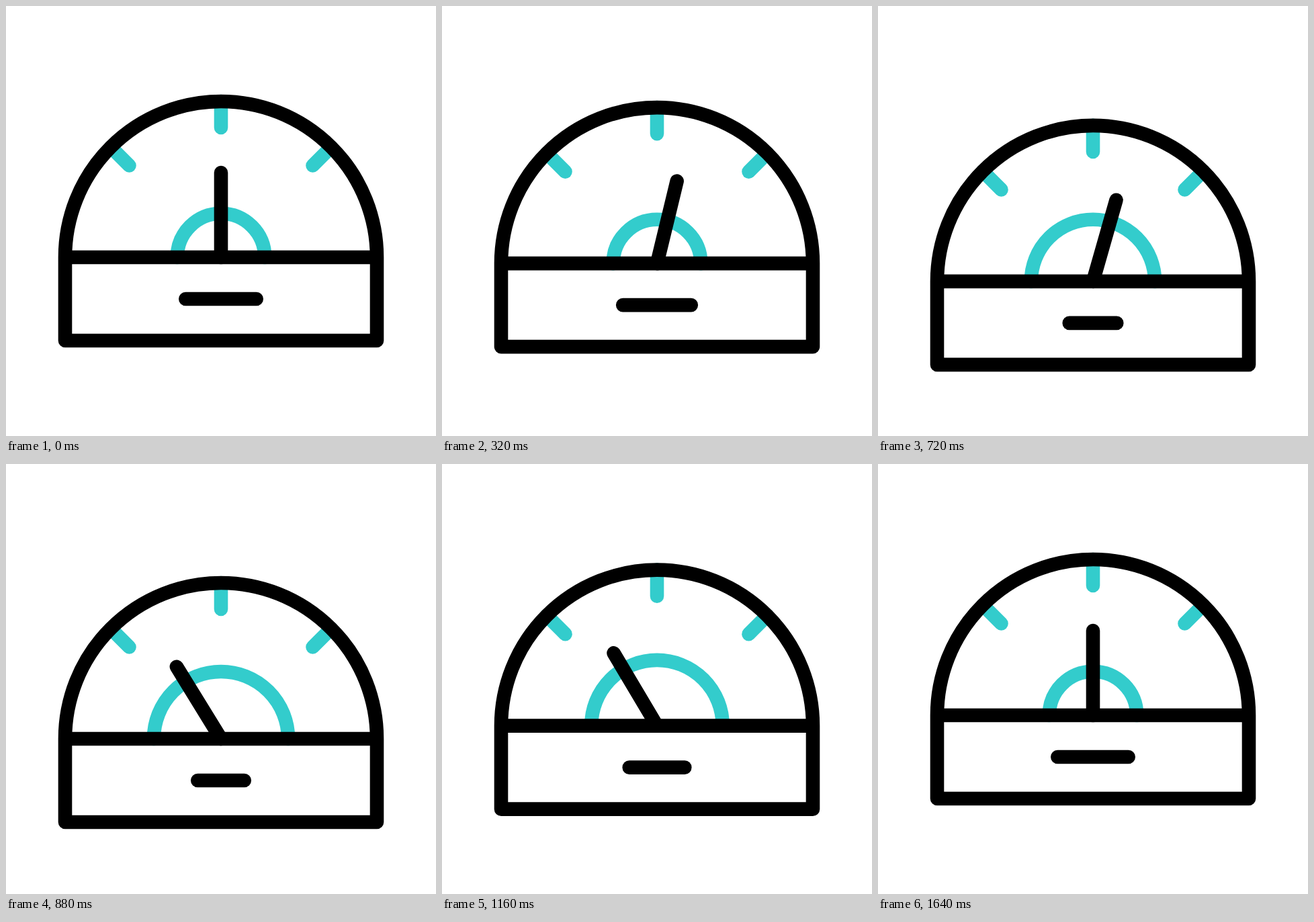
Animation of 640 by 640 pixels, one loop 1840 ms. Source, as an HTML page:

```html
<!DOCTYPE html>
<html lang="en">
<head>
<meta charset="utf-8">
<style>
  html, body { margin: 0; height: 100%; overflow: hidden; background: #fff; }
  svg { display: block; width: 100%; height: 100%; }
  path { fill: none; stroke: #000; stroke-width: 20.6; stroke-linecap: round; stroke-linejoin: round; }
  .accent path { stroke: #3cc; }
</style>
</head>
<body>
<svg viewBox="0 0 640 640">
  <!-- Local origin: the needle's pivot -->
  <g id="gauge">
    <g class="accent">
      <path d="M0-232V-193M-164-164L-136.5-136.5M164-164L136.5-136.5"/>
      <path id="arc"/>
    </g>
    <path d="M-232 0A232 232 0 0 1 232 0V124H-232ZH232"/>
    <path id="dash"/>
    <path id="needle" d="M0 0V-126"/>
  </g>
</svg>
<script>
const LOOP = 1840, STEP = 40;
const [gauge, arc, dash, needle] =
  ['gauge', 'arc', 'dash', 'needle'].map(id => document.getElementById(id));

// cubic-bezier(.6, 0, .4, 1), solved for its parameter by bisection
function ease(x) {
  let low = 0, high = 1;
  for (let i = 0; i < 24; i++) {
    const s = (low + high) / 2, r = 1 - s;
    if (1.8 * s * r * r + 1.2 * s * s * r + s ** 3 < x) low = s; else high = s;
  }
  return low * low * (3 - 2 * low);
}

// Eased value at time t through [time, value] keys
function track(t, ...keys) {
  if (t <= keys[0][0]) return keys[0][1];
  const next = keys.findIndex(([time]) => t < time);
  if (next < 0) return keys.at(-1)[1];
  const [t0, v0] = keys[next - 1], [t1, v1] = keys[next];
  return v0 + (v1 - v0) * ease((t - t0) / (t1 - t0));
}

function draw(now) {
  const t = Math.floor(now % LOOP / STEP) * STEP;
  const drop = track(t, [40, 0], [760, 36], [1520, 0]);
  const half = track(t, [120, 52.7], [840, 34.7], [1560, 52.7]);
  const radius = track(t, [280, 65.2], [1000, 101.2], [1600, 65.2]);
  const angle = track(t, [120, 0], [560, 35], [960, -35], [1640, 0]);
  gauge.setAttribute('transform', `translate(320 ${374 + drop})`);
  dash.setAttribute('d', `M${-half} 62H${half}`);
  arc.setAttribute('d', `M${-radius} 0A${radius} ${radius} 0 0 1 ${radius} 0`);
  needle.setAttribute('transform', `rotate(${angle})`);
}

function tick() {
  draw(performance.now());
  requestAnimationFrame(tick);
}
tick();
</script>
</body>
</html>
```
